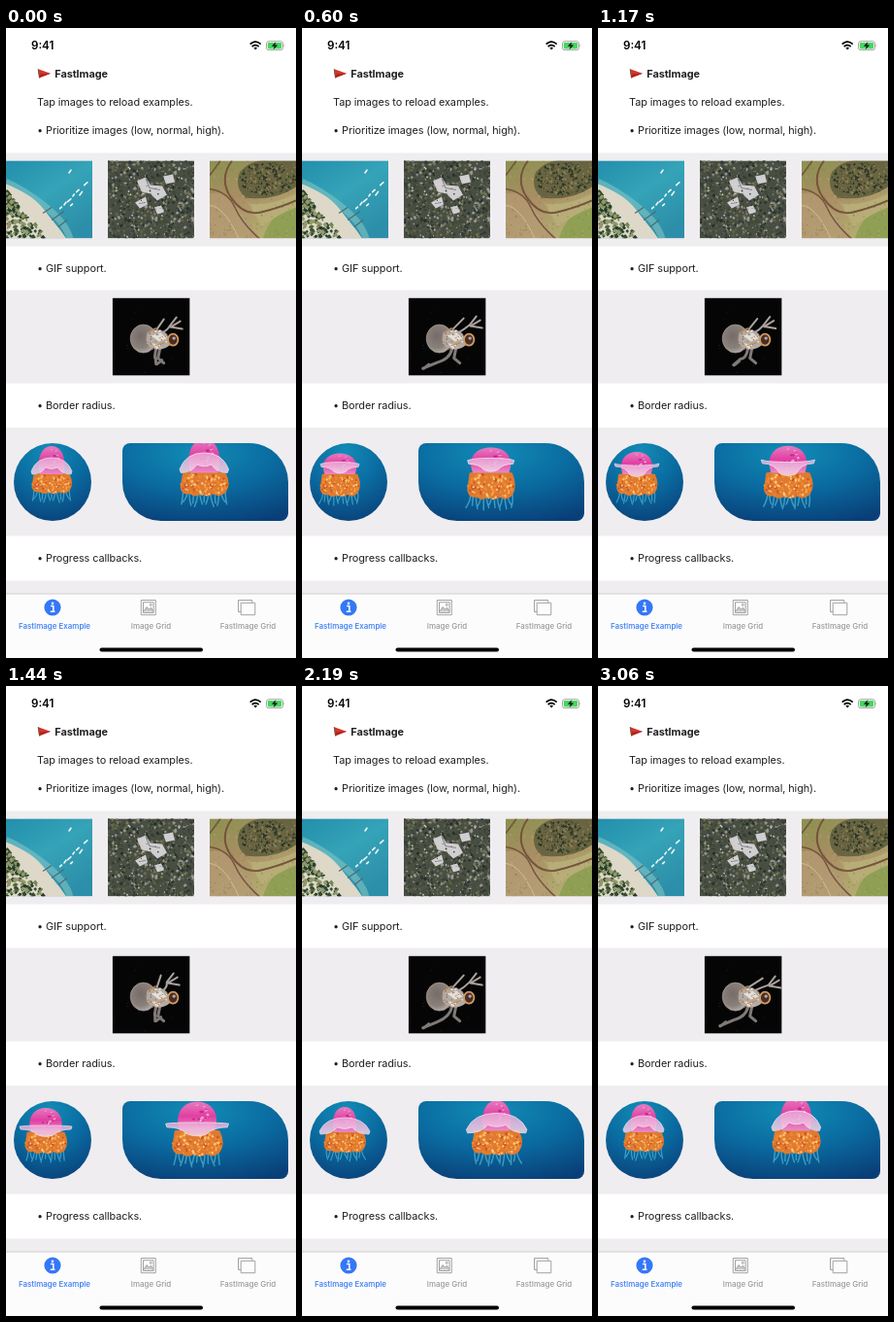
An HTML page that plays this animation: 299 by 648 pixels, repeating every 3090 ms.

```html
<!DOCTYPE html>
<html lang="en">
<head>
<meta charset="utf-8">
<title>FastImage examples</title>
<style>
  html, body { margin: 0; width: 100%; height: 100%; overflow: hidden; background: #fff; }
  #stage { display: block; width: 100vw; height: 100vh; }
  text { font-family: Inter, "Open Sans", sans-serif; fill: #202022; }
  .body text { font-size: 10.9px; letter-spacing: -.08px; }
  .tab { font-size: 7.97px; font-weight: 500; text-anchor: middle; fill: #9a9a9c; }
</style>
</head>
<body>
<svg id="stage" viewBox="0 0 299 648" preserveAspectRatio="none">
  <defs>
    <linearGradient id="lagoon" x1="0" y1="0" x2=".7" y2="1">
      <stop offset="0" stop-color="#238fac"/><stop offset=".5" stop-color="#35a3b8"/><stop offset="1" stop-color="#2c8ea8"/>
    </linearGradient>
    <linearGradient id="field" x1="0" y1="0" x2=".5" y2="1">
      <stop offset="0" stop-color="#8a9250"/><stop offset=".5" stop-color="#a98e64"/><stop offset="1" stop-color="#b1ab70"/>
    </linearGradient>
    <radialGradient id="sea" cx=".45" cy=".12" r=".95">
      <stop offset="0" stop-color="#128cb6"/><stop offset=".5" stop-color="#0a6ba0"/><stop offset="1" stop-color="#093f78"/>
    </radialGradient>
    <linearGradient id="cap" x1="0" y1="0" x2="0" y2="1">
      <stop offset="0" stop-color="#e57cc0"/><stop offset=".5" stop-color="#e23fa2"/><stop offset="1" stop-color="#e88ac4"/>
    </linearGradient>
    <linearGradient id="skirt" x1="0" y1="0" x2="0" y2="1">
      <stop offset="0" stop-color="#e9a6d6"/><stop offset="1" stop-color="#f3d3e8"/>
    </linearGradient>
    <radialGradient id="shell" cx=".4" cy=".4" r=".62">
      <stop offset="0" stop-color="#756c68"/><stop offset=".7" stop-color="#8b817b"/><stop offset="1" stop-color="#b3aaa5"/>
    </radialGradient>
    <clipPath id="round"><circle cx="48" cy="467" r="40"/></clipPath>
    <clipPath id="leaf"><path d="M128 427H251A40 40 0 0 1 291 467V499A8 8 0 0 1 283 507H160A40 40 0 0 1 120 467V435A8 8 0 0 1 128 427Z"/></clipPath>
    <g id="jelly">
      <path id="tentacles" fill="none" stroke="#58c1dc" stroke-width="1.2" stroke-linecap="round" opacity=".65"/>
      <g id="arms">
        <path d="M-18-10Q0-14 18-10Q23 0 18 7Q12 12 8 8Q3 12-2 8Q-8 12-12 8Q-18 10-20 3Z" fill="#df7a30"/>
        <g id="frills"></g>
      </g>
      <path id="bell" fill="url(#cap)"/>
      <g id="spots"></g>
      <path id="veil" fill="url(#skirt)" stroke="#f7e4f2" stroke-width=".8" opacity=".87"/>
    </g>
  </defs>

  <rect width="299" height="648" fill="#fff"/>
  <path d="M0 128.5H299V224.5H0ZM0 269.5H299V365.5H0ZM0 411H299V522.5H0ZM0 568.5H299V584H0Z" fill="#efedf0"/>

  <text x="26" y="22.3" font-size="11.6" font-weight="600" style="fill:#000">9:41</text>
  <g fill="none" stroke="#000" stroke-width="1.7">
    <path d="M251.7 16.6Q257.2 11.8 262.7 16.6M253.7 19.1Q257.2 16.1 260.7 19.1"/>
    <path d="M255.4 20.5Q257.2 19 259 20.5L257.2 22.6Z" fill="#000" stroke="none"/>
  </g>
  <rect x="268.5" y="13.7" width="17" height="9" rx="2.4" fill="none" stroke="#8b8b8b" stroke-width=".8"/>
  <rect x="269.8" y="15" width="14.4" height="6.4" rx="1.3" fill="#46d660"/>
  <path d="M286.6 16.6Q288 18.2 286.6 19.8Z" fill="#8b8b8b"/>
  <path d="M278.2 14.3L273.8 18.8H276.7L275.7 22.2L280.2 17.5H277.3Z" fill="#111"/>

  <path d="M33.2 42.2L46 46.7L34.2 51.2Z" fill="#d3352c"/>
  <path d="M33.2 42.2L34.5 51.4" stroke="#7c4a35" stroke-width="1"/>
  <path d="M35 47.5L46 46.7L34.2 51.2Z" fill="#ac241f"/>
  <g class="body">
    <text x="50.3" y="50.9" font-weight="700">FastImage</text>
    <text x="32" y="80">Tap images to reload examples.</text>
    <text x="32" y="109.4">• Prioritize images (low, normal, high).</text>
    <text x="32" y="250.6">• GIF support.</text>
    <text x="32" y="391.8">• Border radius.</text>
    <text x="32" y="549.4">• Progress callbacks.</text>
  </g>

  <path d="M0 136.5H89V216.2H0ZM105 136.5H194V216.2H105ZM210 136.5H299V216.2H210Z" fill="#dddcdf"/>
  <svg id="beach" y="136.5" width="89" height="79.7">
    <rect width="89" height="80" fill="url(#lagoon)"/>
    <path d="M0 22Q17 29 39 46T66 80" fill="none" stroke="#80c3c4" stroke-width="7" opacity=".6"/>
    <path d="M0 24C15 30 30 38 39 50S55 69 62 80H0Z" fill="#ddd8c8"/>
    <g id="palms"></g>
    <path d="M38 54L47 48M47 61L60 52M54 68L63 61" stroke="#54666a" stroke-width="1.1"/>
    <g id="boats" fill="#f2f6f6"></g>
  </svg>
  <svg id="village" x="105" y="136.5" width="89" height="79.7">
    <rect width="89" height="80" fill="#494e43"/>
    <g id="woods"></g>
    <path d="M30 21L39 17L44 25L56 26L61 35L51 41L44 34L35 32ZM28 43L39 37L41 45L33 49ZM57 16L67 14L69 22L60 24ZM48 48L55 46L58 53L51 55Z" fill="#d0ced1"/>
    <path d="M39 18L43 28L54 30M32 44L39 43" stroke="#8a8a8d" stroke-width="1.2" fill="none"/>
    <g id="twigs"></g>
  </svg>
  <svg id="hills" x="210" y="136.5" width="89" height="79.7">
    <rect width="89" height="80" fill="url(#field)"/>
    <path d="M0 34Q18 30 27 45T53 80H0Z" fill="#b49a75" opacity=".75"/>
    <path d="M55 80Q63 53 89 45V80Z" fill="#8f9f54"/>
    <path d="M89 34Q63 47 40 44L54 68Q70 55 89 48Z" fill="#b7ad77"/>
    <g fill="none" stroke="#75533c">
      <path d="M23 0Q9 19 22 38T53 53T89 41" stroke-width="2"/>
      <path d="M0 29Q19 32 26 48T51 80M11 0Q4 10 0 15" stroke-width="1.5"/>
      <path d="M0 46Q15 47 30 80" stroke="#d2bd95"/>
    </g>
    <path d="M31 12Q43-2 60 0H89V27Q67 42 37 38Q25 28 31 12Z" fill="#686442"/>
    <g id="orchard"></g>
    <g id="grass" opacity=".6"></g>
  </svg>

  <svg x="109.7" y="277.6" width="79.8" height="79.8">
    <rect width="80" height="80" fill="#050505"/>
    <g id="plankton"></g>
    <g id="limbs" fill="none" stroke="#aaa29e" stroke-linecap="round" stroke-linejoin="round">
      <path id="upper" stroke-width="2"/>
      <path id="lower" stroke-width="3" opacity=".75"/>
    </g>
    <ellipse cx="32" cy="42" rx="13.5" ry="14.5" fill="url(#shell)" stroke="#a79d98" stroke-width=".7"/>
    <path d="M36 36Q47 29 56 37L60 48Q50 57 38 50Q33 44 36 36Z" fill="#b2aaa3"/>
    <path d="M40 39L50 36L56 42L48 45ZM41 47L51 48L46 53Z" fill="#e4ded4"/>
    <path d="M38 35L45 31M44 49L54 46" stroke="#c58d4d" stroke-width="1.4"/>
    <g id="flecks"></g>
    <ellipse cx="62.5" cy="43" rx="5.2" ry="6" fill="#4a2d26" stroke="#d09a61" stroke-width="1.8"/>
    <circle cx="63.5" cy="41.5" r="1.7" fill="#b3aca9"/>
  </svg>

  <g clip-path="url(#round)">
    <rect x="8" y="427" width="80" height="80" fill="url(#sea)"/>
    <use href="#jelly" transform="translate(48 467)"/>
  </g>
  <g clip-path="url(#leaf)">
    <rect x="120" y="427" width="171" height="80" fill="url(#sea)"/>
    <use href="#jelly" transform="translate(205.5 467) scale(1.2)"/>
  </g>

  <rect y="582" width="299" height="66" fill="#fcfcfc"/>
  <path d="M0 582H299" stroke="#c4c4c7" stroke-width=".8"/>
  <circle cx="48" cy="596" r="8.6" fill="#3478f6"/>
  <path d="M46 594.5H48.8V600M45.8 600.2H50.4" fill="none" stroke="#fff" stroke-width="1.5"/>
  <circle cx="48" cy="591.7" r="1.25" fill="#fff"/>
  <g fill="none" stroke="#a2a2a4">
    <path d="M139.3 588.5H154.3V603.7H139.3ZM141.5 590.7H152.1V601.5H141.5Z"/>
    <path d="M141.6 600.5L145.2 595.5L147.5 598L149.5 596.2L152 600.5" fill="#c9c9cb"/>
    <circle cx="149.3" cy="593.3" r="1"/>
    <path d="M242.2 600.5H239.5V588.5H253.8V591.2M242.2 591.3H256.8V603.7H242.2Z"/>
  </g>
  <text class="tab" x="50" y="618" style="fill:#3478f6">FastImage Example</text>
  <text class="tab" x="149.5" y="618">Image Grid</text>
  <text class="tab" x="249.5" y="618">FastImage Grid</text>
  <rect x="96.5" y="637.4" width="106.5" height="4" rx="2" fill="#000"/>
</svg>
<script>
const LOOP = 3090;
const $ = id => document.getElementById(id);
const set = (id, name, value) => $(id).setAttribute(name, value);

let seed = 41;
const rnd = () => (seed = (seed * 16807) % 2147483647) / 2147483647;
const spread = (w, h) => () => [rnd() * w, rnd() * h];
const disc = (cx, cy, rx, ry) => () => {
  const a = rnd() * 2 * Math.PI, r = Math.sqrt(rnd());
  return [cx + r * rx * Math.cos(a), cy + r * ry * Math.sin(a)];
};

// Scatter small irregular leaves, one path per colour.
function scatter(id, count, place, size, colors) {
  $(id).innerHTML = colors.map(color => {
    let d = '';
    for (let i = 0; i < count / colors.length; i++) {
      const [x, y] = place(), r = size * (.4 + rnd() * .6), k = r * (rnd() - .5);
      d += `M${(x - r).toFixed(1)} ${(y + k).toFixed(1)}l${r.toFixed(1)} ${(-r).toFixed(1)}`
         + `l${r.toFixed(1)} ${(r - k).toFixed(1)}l${(-r).toFixed(1)} ${r.toFixed(1)}z`;
    }
    return `<path d="${d}" fill="${color}"/>`;
  }).join('');
}

const inland = () => {
  const y = 32 + rnd() * 48;
  return [rnd() * Math.max(2, (y - 31) * .88), y];
};
scatter('palms', 190, inland, 2.8, ['#758857', '#324a30', '#4d693b', '#233c2c', '#93986b']);
$('boats').innerHTML = [[57, 48], [61, 44], [65, 41], [70, 35], [74, 31], [77, 34], [68, 45], [66, 11], [82, 24]]
  .map(([x, y], i) => `<rect x="-2.6" y="-.8" width="${4 + i % 3}" height="1.6" rx=".8" transform="translate(${x} ${y}) rotate(${-42 - i % 2 * 12})"/>`).join('');
scatter('woods', 680, spread(89, 80), 2.1, ['#77795b', '#272d28', '#989893', '#3f4935', '#5d6345', '#303d39']);
scatter('twigs', 170, spread(89, 80), 1.1, ['#d7d6d7', '#333a30', '#7b7e5b']);
scatter('orchard', 230, disc(60, 19, 29, 17), 1.7, ['#303b27', '#4a5231', '#8c7d54', '#293425']);
scatter('grass', 220, spread(89, 80), 1, ['#71743e', '#c5b27e', '#937450']);
scatter('plankton', 24, spread(80, 80), .6, ['#25272a', '#45423e']);
scatter('flecks', 42, disc(46, 43, 12, 10), 1.1, ['#eee8df', '#806e64', '#b77c4e']);
scatter('frills', 135, disc(0, 0, 20, 9.5), 1.5, ['#f7a33d', '#c95425', '#ffc880', '#ed8930']);
scatter('spots', 20, disc(0, 0, .8, .65), .12, ['#f5a9d8', '#c62a91']);

// time, drift, bell top, bell half width, veil centre, veil edge, veil half width, arms bottom
const jellyKeys = [
  [0, -1, -37, 12, -25, -11, 21, 12],
  [300, -9, -30, 17, -22, -13, 21, 16],
  [900, -9, -29, 14, -19, -24, 19, 14],
  [1440, -7, -33, 15, -15, -14, 27, 14],
  [2190, -4, -34, 11, -23, -9, 26, 13],
  [2640, -1, -36, 12, -25, -11, 22, 12],
  [3090, -1, -37, 12, -25, -11, 21, 12]
];
// time, upper limb tip, lower limb tip
const limbKeys = [
  [0, 66, 20, 45, 68], [300, 68, 17, 14, 74], [900, 72, 21, 16, 71], [1440, 63, 18, 44, 67],
  [2190, 70, 18, 15, 74], [2640, 71, 22, 15, 75], [3060, 73, 21, 16, 72], [3090, 66, 20, 45, 68]
];

function pose(keys, t) {
  const i = Math.max(1, keys.findIndex(k => k[0] > t));
  const a = keys[i - 1], b = keys[i], u = (t - a[0]) / (b[0] - a[0]);
  return a.map((v, j) => v + (b[j] - v) * u).slice(1);
}

function drawJelly(t) {
  const [drift, top, w, mid, edge, half, bottom] = pose(jellyKeys, t);
  const base = -8, h = base - top;
  set('jelly', 'transform', `translate(${drift} 0)`);
  set('bell', 'd', `M${-w} ${base}C${-w * 1.35} ${base - h * .6} ${-w * .8} ${top} 0 ${top}S${w * 1.35} ${base - h * .6} ${w} ${base}Z`);
  set('spots', 'transform', `translate(0 ${top + h * .45}) scale(${w} ${h * .5})`);
  set('veil', 'd', `M${-half} ${edge}Q${-half * .75} ${mid} 0 ${mid}T${half} ${edge}`
    .replace(`T${half} ${edge}`, `Q${half * .75} ${mid} ${half} ${edge}`)
    + `l-1 3Q${half * .5} ${edge + 3} ${half * .3} ${mid + 10}Q0 ${mid + 13} ${-half * .3} ${mid + 10}Q${-half * .5} ${edge + 3} ${1 - half} ${edge + 3}Z`);
  set('arms', 'transform', `translate(0 ${(bottom + base) / 2}) scale(${(17 + half * .17) / 20} ${(bottom - base) / 20})`);
  let d = '';
  for (let i = -6; i <= 6; i++) {
    const x = i * 3, sway = Math.sin(t / LOOP * 2 * Math.PI + i * 2.1) * 2;
    d += `M${x} ${bottom - 6}q${sway} 5 ${i * .25 - sway} ${11 + Math.abs(i * 7 % 5)}`;
  }
  set('tentacles', 'd', d);
}

function drawLimbs(t) {
  const [ux, uy, lx, ly] = pose(limbKeys, t);
  set('upper', 'd', `M51 36Q57 33 ${ux - 7} ${uy + 9}L${ux} ${uy}M${ux - 6} ${uy + 10}L${ux + 4} ${uy + 4}M${ux - 6} ${uy + 10}L${ux + 6} ${uy + 12}M46 32L${ux - 13} ${uy + 2}`);
  set('lower', 'd', `M45 52Q43 63 ${(lx + 44) / 2} ${ly - 6}L${lx} ${ly}M${lx + 1} ${ly}l5-4M49 52L47 62L53 67`);
}

function showTiles(t) {
  const reloaded = { beach: 1110, village: 1020, hills: 840 };
  for (const id in reloaded) $(id).style.display = t >= 690 && t < reloaded[id] ? 'none' : '';
  $('hills').style.filter = t >= 840 && t < 1020 ? 'contrast(1.2) brightness(.93)' : '';
}

function render(now) {
  const t = now % LOOP;
  drawJelly(t);
  drawLimbs(t);
  showTiles(t);
}

let start;
function tick(now) {
  start ??= now;
  render(now - start);
  requestAnimationFrame(tick);
}
render(0);
requestAnimationFrame(tick);
</script>
</body>
</html>
```
